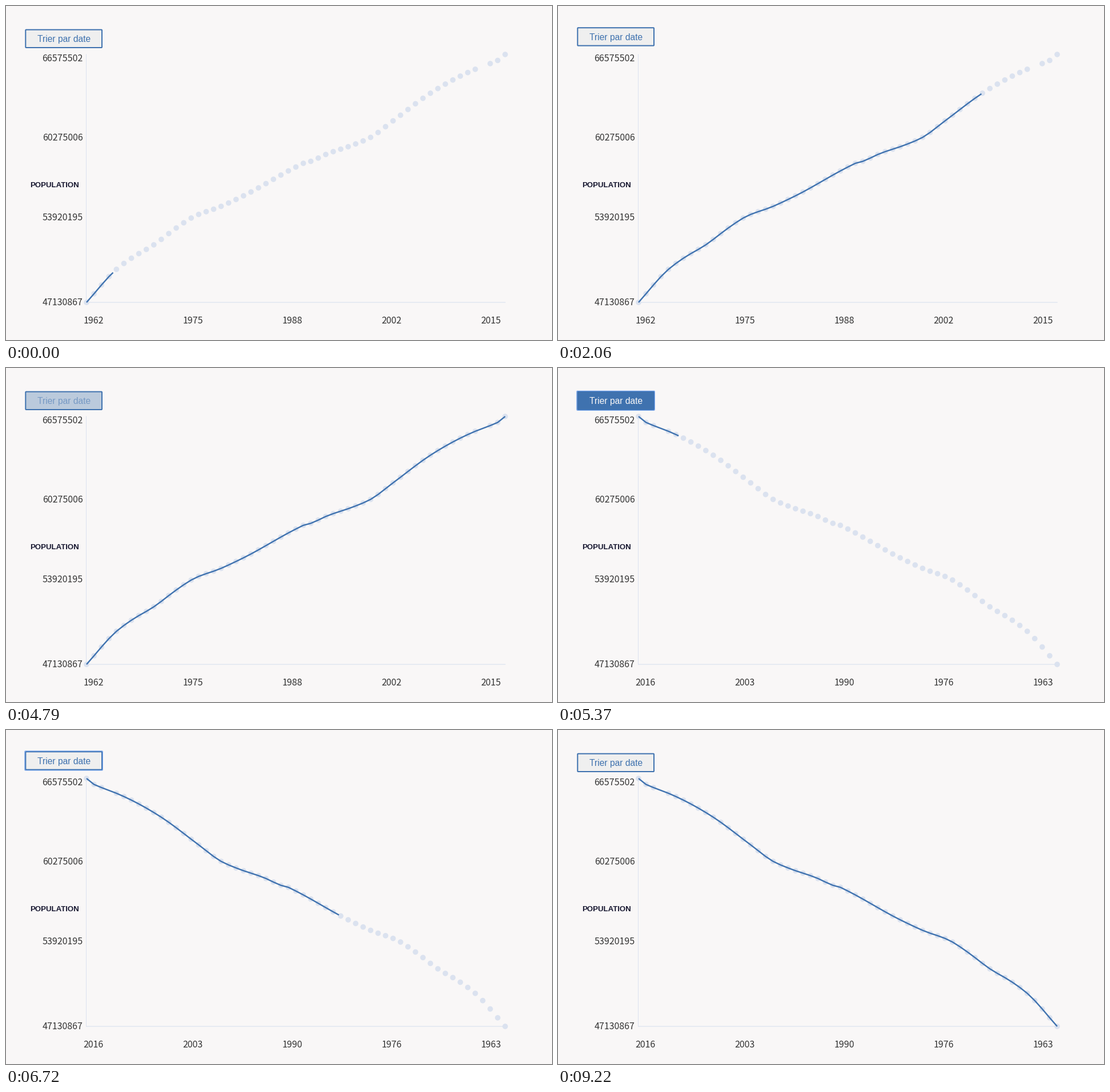
A matplotlib script for the animation above (9320 ms loop, 956 by 586 pixels).

```python
import matplotlib.pyplot as plt
import numpy as np
from matplotlib.animation import FuncAnimation
from matplotlib.collections import PatchCollection
from matplotlib.colors import to_rgb
from matplotlib.patches import Circle, FancyBboxPatch

W, H, DPI = 956, 586, 64
LOOP, STEP = 9320, 20

PAPER, PALE, BLUE, NAVY = "#f9f7f7", "#dbe2ef", "#3f72af", "#112d4e"
BUTTON_GREY, FOCUS = "#efefef", "#5590e8"
SANS, UI = "Noto Sans CJK JP", "Liberation Sans"

RESORT = 5060                 # click: the order of the dates is reversed
TOOLTIP = (3640, 4350)
FOCUS_END = 9220
HOVER = ([4730, 4900, 5600, 5770], [0, 1, 1, 0])
BOUNCE_START, BOUNCE_TIME, BOUNCE_PERIOD = 1365, 1500, LOOP / 2

LEFT, RIGHT, BASE, TOP = 141, 874, 520, 85
LOW, HIGH = 47130867, 66575502

# Turning points of the curve: years since the first, height on the stage.
KNOTS = [(0, 520), (4, 462), (6, 442.5), (9, 419), (12, 389.5), (14, 372),
         (18, 351.5), (21, 333), (28, 282.5), (29, 276), (30, 272.5),
         (32, 260.5), (36, 242), (38, 230.5), (41, 201.5), (46, 153),
         (52, 111), (54, 101), (55, 95.5), (56, 85)]

# Drawn length of the line over time, for each order.
RISING_KEYS = ([0, 1310, 2060, 2560], [70, 468, 711, 863])
FALLING_KEYS = ([5090, 5365, 6720, 7800], [0, 80, 506, 863])


def px(n):
    return n * 72 / DPI


def mix(a, b, k):
    return tuple((1 - k) * np.array(to_rgb(a)) + k * np.array(to_rgb(b)))


def smooth(x, knots):
    """Cubic Hermite curve through the knots."""
    kx, ky = np.array(knots, float).T
    slope = np.gradient(ky, kx)
    i = np.clip(np.searchsorted(kx, x, side="right") - 1, 0, len(kx) - 2)
    h = kx[i + 1] - kx[i]
    s = (x - kx[i]) / h
    blend = s * s * (3 - 2 * s)
    return (ky[i] + (ky[i + 1] - ky[i]) * blend
            + h * s * (1 - s) * (slope[i] * (1 - s) - slope[i + 1] * s))


def ease(k):
    """CSS 'ease': cubic-bezier(.25, .1, .25, 1)."""
    s = np.linspace(0, 1, 101)
    x = 0.75 * s * (1 - s) ** 2 + 0.75 * s**2 * (1 - s) + s**3
    y = 0.3 * s * (1 - s) ** 2 + 3 * s**2 * (1 - s) + s**3
    return np.interp(k, x, y)


def bounce(t):
    """Vertical offset of the button."""
    stops = [(0, 0), (0.2, -15), (0.3, 0), (0.4, -7.5), (0.6, 0)]
    k = (t % BOUNCE_PERIOD - BOUNCE_START) / BOUNCE_TIME
    for (k0, y0), (k1, y1) in zip(stops, stops[1:]):
        if k0 <= k < k1:
            return y0 + (y1 - y0) * ease((k - k0) / (k1 - k0))
    return 0


def partial(points, length):
    """First part of a polyline, cut at the given length."""
    run = np.r_[0, np.cumsum(np.hypot(*np.diff(points, axis=0).T))]
    length = min(length, run[-1])
    tip = [np.interp(length, run, points[:, i]) for i in (0, 1)]
    return np.vstack([points[run < length], tip])


years = np.delete(np.arange(57), 53)      # one year has no value
xs = LEFT + (RIGHT - LEFT) * years / 56
rising = np.column_stack([xs, smooth(years, KNOTS)])
falling = (rising * [-1, 1] + [LEFT + RIGHT, 0])[::-1]

fig = plt.figure(figsize=(W / DPI, H / DPI), dpi=DPI, facecolor=PAPER)
ax = fig.add_axes([0, 0, 1, 1])
ax.set_xlim(0, W)
ax.set_ylim(H, 0)
ax.axis("off")


def label(x, y, text, size=16, color="#333333", font=SANS, **kw):
    return ax.text(x, y, text, fontsize=px(size), color=color, family=font,
                   va="baseline", zorder=6, **kw)


def dots(points):
    circles = [Circle(p, 4.8) for p in points]
    return ax.add_collection(PatchCollection(
        circles, facecolor=PALE, edgecolor="none", zorder=2))


def box(left, top, right, bottom, **kw):
    return ax.add_patch(FancyBboxPatch(
        (left, top), right - left, bottom - top, snap=False, zorder=5,
        boxstyle="round,pad=0,rounding_size=1", **kw))


ax.plot([140.5, 140.5], [TOP, BASE], color=PALE, lw=px(1), snap=False)
ax.plot([LEFT, RIGHT], [BASE, BASE], color=PALE, lw=px(1.2), snap=False)
for value in (LOW, 53920195, 60275006, HIGH):
    y = round(525 - 428 * (value - LOW) / (HIGH - LOW))
    label(134.5, y, str(value), ha="right")
label(42.5, 318, "POPULATION", 13.3, "#15152e", UI, weight="bold")
ticks = [label(153 + 174.1 * i, 557, "", ha="center") for i in range(5)]

rising_dots, falling_dots = dots(rising), dots(falling)
line, = ax.plot([], [], color=BLUE, lw=px(2.4), zorder=4,
                solid_capstyle="butt", solid_joinstyle="miter")

marker = ax.add_patch(Circle(rising[11], 8.4, fc=NAVY, ec="none", zorder=3))
tooltip = label(297, 411, "52776806,1972", 16.7, "#4c5462")

BUTTON_TOP, RING_TOP, CAPTION_BASE = 41.6, 40.3, 63
button = box(34.3, BUTTON_TOP, 168, 73, ec=BLUE, lw=px(2))
ring = box(32.9, RING_TOP, 169.2, 74.2, fc="none", ec=FOCUS, lw=px(1))
caption = label(101.2, CAPTION_BASE, "Trier par date", 15.6, BLUE, UI,
                ha="center")


def draw(i):
    t = i * STEP
    resorted = t >= RESORT
    first, sign = (2016, -1) if resorted else (1962, 1)
    points, keys = ((falling, FALLING_KEYS) if resorted
                    else (rising, RISING_KEYS))

    for n, tick in enumerate(ticks):
        tick.set_text(str(round(first + sign * 13.25 * n)))
    rising_dots.set_visible(not resorted)
    falling_dots.set_visible(resorted)
    line.set_data(*partial(points, np.interp(t, *keys)).T)

    for part in (marker, tooltip):
        part.set_visible(TOOLTIP[0] <= t < TOOLTIP[1])

    dy, hover = bounce(t), np.interp(t, *HOVER)
    button.set_y(BUTTON_TOP + dy)
    button.set_facecolor(mix(BUTTON_GREY, BLUE, hover))
    ring.set_y(RING_TOP + dy)
    ring.set_visible(RESORT <= t < FOCUS_END)
    caption.set_y(CAPTION_BASE + dy)
    caption.set_color(mix(BLUE, PAPER, hover))
    return []


anim = FuncAnimation(fig, draw, frames=LOOP // STEP, interval=STEP,
                     repeat=True, repeat_delay=0, blit=False)
plt.show()
```
